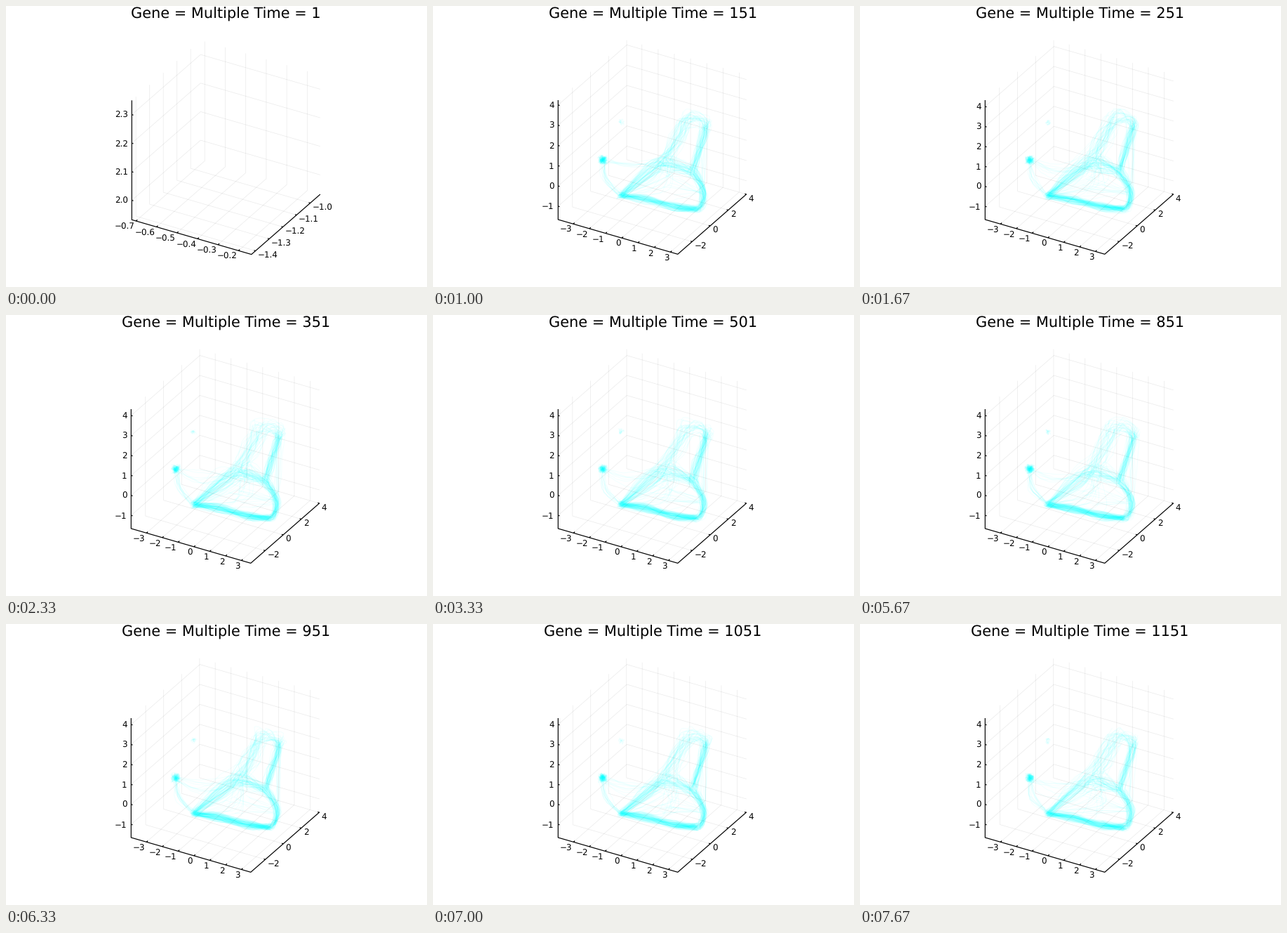
Recreate the animation shown at these times as a matplotlib script. Size 600 px wide and 400 px high, loop 8 s.

```python
import numpy as np
import matplotlib.pyplot as plt
from matplotlib.animation import FuncAnimation
from matplotlib.collections import LineCollection

plt.rcParams["font.family"] = "DejaVu Sans"
plt.rcParams["text.hinting"] = "none"

W, H, DPI = 600, 400, 100
STEPS, FRAMES, LOOP_MS = 24, 160, 8000
PX = 72 / DPI

# Screen vectors of the three box edges
EDGE_X = np.array([170.5, 49.3])
EDGE_Y = np.array([98.0, -85.5])
EDGE_Z = np.array([0.0, -170.0])

# Places the trajectories visit: x, y, spread
PLACES = {
    "tip": (267, 270, 2.5), "shore": (302, 275, 3.2), "beach": (345, 286, 3.2),
    "corner": (379, 289, 2.8), "bend": (386, 266, 3), "waist": (370, 237, 4),
    "neck": (376, 212, 3.5), "ridge": (386, 184, 3.5), "crown": (389, 166, 5),
    "cap": (364, 160, 7), "slope": (348, 190, 7), "hill": (312, 233, 7),
    "crest": (338, 223, 7), "floor": (330, 257, 11), "blob": (242, 219, 3.1),
    "drop": (246, 246, 3), "mist": (280, 234, 6), "spot": (268, 166, 2.2),
}

# Number of trajectories along each route
ROUTES = {
    "tip shore beach corner": 110,
    "beach corner bend waist": 30,
    "waist neck ridge crown": 38,
    "tip hill slope cap crown ridge waist": 32,
    "tip hill crest waist bend corner": 45,
    "cap slope crest waist": 20,
    "tip floor crest": 14,
    "floor bend": 12,
    "crown bend corner": 9,
    "blob drop tip": 14,
    "blob mist crest": 9,
    "blob blob blob blob": 90,
    "spot spot spot": 9,
}


def axis_limits(step):
    """The box fits the first state, then opens and settles."""
    if step == 0:
        return (-0.7204, -0.1368), (-1.43, -0.9275), (1.9318, 2.350)
    settle = np.clip((step - 3) / 2, 0, 1)
    drift = (step / STEPS) ** 4
    return ((-3.93 - 0.04 * settle, 3.45 + 0.14 * settle),
            (-3.59 - 0.09 * drift, 4.02 + 0.04 * drift),
            (-1.66, 4.24 + 0.08 * settle))


def smooth(points, samples=9):
    """Catmull-Rom curves through points of shape (lines, knots, 2)."""
    p = np.concatenate([points[:, :1], points, points[:, -1:]], axis=1)
    t = np.linspace(0, 1, samples, endpoint=False)[None, None, :, None]
    a, b, c, d = (p[:, k:p.shape[1] - 3 + k, None] for k in range(4))
    curve = 0.5 * (2 * b + (c - a) * t + (2 * a - 5 * b + 4 * c - d) * t ** 2
                   + (3 * b - a - 3 * c + d) * t ** 3)
    return curve.reshape(len(points), -1, 2)


def trajectories(step):
    rng = np.random.default_rng(100 + step)
    lines = []
    for route, count in ROUTES.items():
        knots = np.array([PLACES[name] for name in route.split()])
        n = int(count * rng.uniform(0.8, 1.2))
        noise = rng.normal(size=(n, len(knots), 2))
        curves = smooth(knots[:, :2] + knots[:, 2:] * np.clip(noise, -2, 2))
        lines.extend(curves + rng.normal(0, 0.4, curves.shape))
    return lines


def draw_box(step):
    origin = np.array([179.3, 304.3] if step == 0 else [178.3, 304.0])
    if step == 0:
        ticks = [np.arange(-7, -1) / 10, np.arange(-14, -9) / 10,
                 np.arange(20, 24) / 10]
    else:
        ticks = [np.arange(-3, 4), np.arange(-2, 5, 2), np.arange(-1, 5)]

    def at(u, v, w):
        return origin + u * EDGE_X + v * EDGE_Y + w * EDGE_Z

    def label(value, pos, dx, dy, align):
        text = f"{value:.1f}" if step == 0 else str(value)
        ax.text(pos[0] + dx, pos[1] + dy + 4.35, text.replace("-", "\u2212"),
                fontsize=11.9 * PX, ha=align, va="baseline")

    grid, marks = [], []
    for axis, (low, high) in enumerate(axis_limits(step)):
        for value in ticks[axis]:
            f = (value - low) / (high - low)
            if axis == 0:
                grid.append([at(f, 0, 0), at(f, 1, 0), at(f, 1, 1)])
                marks.append([at(f, 0, 0), at(f, 0.02, 0)])
                label(value, at(f, 0, 0), -1.6, 7.7, "right")
            elif axis == 1:
                grid.append([at(1, f, 0), at(0, f, 0), at(0, f, 1)])
                marks.append([at(1, f, 0), at(1 - 0.013, f, 0)])
                label(value, at(1, f, 0), 3, 5.6, "left")
            else:
                grid.append([at(0, 0, f), at(0, 1, f), at(1, 1, f)])
                marks.append([at(0, 0, f), at(0.013, 0, f)])
                label(value, at(0, 0, f), -5.6, 0, "right")
    frame = [[at(0, 0, 1), at(0, 0, 0), at(1, 0, 0), at(1, 1, 0)]]
    ax.add_collection(LineCollection(grid, colors=[(0, 0, 0, 0.08)],
                                     linewidths=0.75 * PX, zorder=1))
    ax.add_collection(LineCollection(frame + marks, colors="black",
                                     linewidths=1.2 * PX, zorder=3))


def draw_step(step):
    ax.cla()
    ax.set(xlim=(0, W), ylim=(H, 0))
    ax.axis("off")
    ax.text(313.3, 18, f"Gene = Multiple Time = {1 + 50 * step}",
            fontsize=20.83 * PX, ha="center", va="baseline")
    draw_box(step)
    if step > 0:
        ax.add_collection(LineCollection(
            trajectories(step), colors=[(0, 1, 1, 0.05)],
            linewidths=1.0 * PX, zorder=2))


shown = {"step": None}


def draw(i):
    step = min((i + 1) * STEPS // FRAMES, STEPS - 1)
    if step != shown["step"]:
        draw_step(step)
        shown["step"] = step
    return []


def reset():
    shown["step"] = None
    return []


fig = plt.figure(figsize=(W / DPI, H / DPI), dpi=DPI, facecolor="white")
ax = fig.add_axes([0, 0, 1, 1])
anim = FuncAnimation(fig, draw, frames=FRAMES, interval=LOOP_MS / FRAMES,
                     init_func=reset, repeat=True, repeat_delay=0)
plt.show()
```
